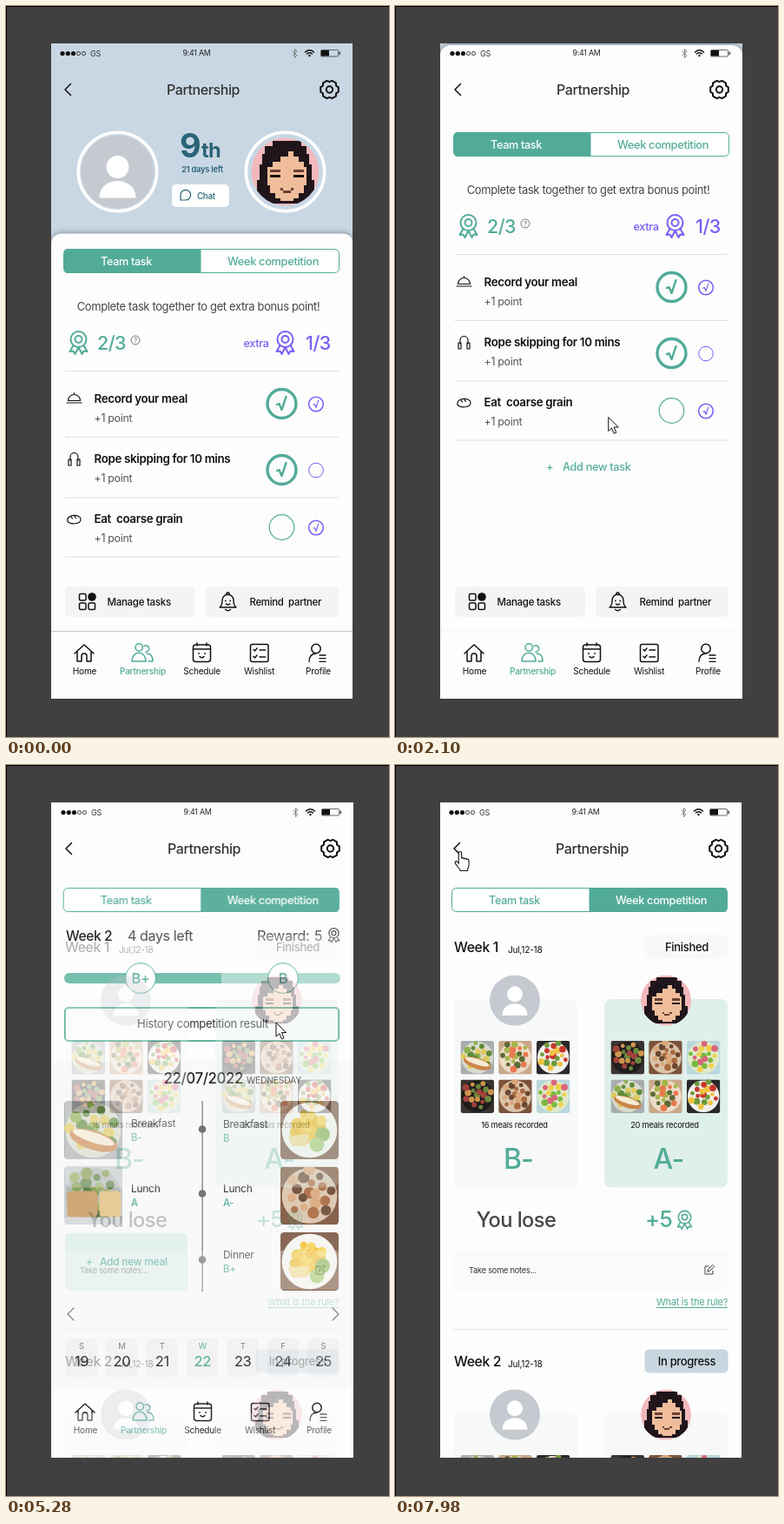
Animation, 441 px wide and 840 px high, one loop 8000 ms. Source, as an HTML page:

```html
<!DOCTYPE html>
<html lang="en">
<head>
<meta charset="utf-8">
<title>Partnership tasks</title>
<style>
  html, body { margin: 0; height: 100%; overflow: hidden; background: #404040; }
  #stage { display: block; width: 100vw; height: 100vh; }
  text { font-family: Inter, "Open Sans", sans-serif; letter-spacing: -.025em; white-space: pre; }
  .sheet { filter: drop-shadow(0 -1px 3px #0005); }
  .line { fill: none; stroke: #111; stroke-width: 1.5; stroke-linecap: round; stroke-linejoin: round; }
</style>
</head>
<body>
<svg id="stage" viewBox="0 0 441 840"></svg>
<script>
const GREEN = '#52ab98', VIOLET = '#7b5cf5', PAPER = '#fdfdfd', TEAL = '#2a6478', BLUE = '#c8d7e3';

// Drawing helpers: each returns SVG markup
const text = (s, x, y, size, fill = '#111', weight = 400, anchor = 'start') =>
  `<text x="${x}" y="${y}" font-size="${size}" fill="${fill}" font-weight="${weight}" text-anchor="${anchor}">${s}</text>`;
const mid = (s, x, y, size, fill, weight) => text(s, x, y, size, fill, weight, 'middle');
const box = (x, y, w, h, r, fill, more = '') =>
  `<rect x="${x}" y="${y}" width="${w}" height="${h}" rx="${r}" fill="${fill}" ${more}/>`;
const disc = (x, y, r, fill, more = '') => `<circle cx="${x}" cy="${y}" r="${r}" fill="${fill}" ${more}/>`;
const ring = (x, y, r, color, w) => disc(x, y, r, 'none', `stroke="${color}" stroke-width="${w}"`);
const line = (d, more = '') => `<path class="line" d="${d}" ${more}/>`;
const ink = (color, w) => `style="stroke:${color};stroke-width:${w}"`;
const rule = y => box(68, y, 315, 1, 0, '#e0e0e0');
const at = (x, y, s, body) => `<g transform="translate(${x} ${y}) scale(${s})">${body}</g>`;

const medal = (x, y, s, color) => at(x, y, s,
  ring(0, -3, 9, color, 2) + ring(0, -3, 4, color, 2) +
  line('M-6 4-10 11-6 10.5-4 14 0 6 4 14 6 10.5 10 11 6 4', ink(color, 2)));
const tick = (x, y, s, color, w) => at(x, y, s, line('M-5.5 1 -3 0 0 7 5 -8', ink(color, w)));

const person = (x, y, s, lift = 0) => at(x, y, s, disc(0, 0, 42, '#c5cad0') +
  at(0, -lift, 1, disc(0, -5.5, 13, '#fff') + '<path d="M-21 30c0-26 42-26 42 0z" fill="#fff"/>'));

const pixels = (color, list) => list.map(r => box(...r, 0, color)).join('');
const girl = (x, y, s) => at(x, y, s, `<g clip-path="url(#round)">` + disc(0, 0, 39, '#f2b8bb') +
  `<g transform="scale(3)" shape-rendering="crispEdges">` +
  pixels('#1f151b', [[-5, -12, 11, 2], [-8, -10, 16, 3], [-9, -7, 18, 4], [-10, -3, 20, 6], [-11, 3, 22, 9]]) +
  pixels('#f0bd9c', [[1, -8, 2, 2], [-2, -6, 7, 2], [-5, -4, 12, 2], [-7, -2, 15, 7], [-6, 5, 13, 3], [-4, 8, 9, 2], [-2, 10, 5, 1]]) +
  pixels('#6b3f33', [[-6, -1, 4, 1], [3, -1, 4, 1], [-2, 6, 1, 1], [-1, 7, 3, 1], [2, 6, 1, 1]]) +
  pixels('#151013', [[-6, 1, 4, 1], [3, 1, 4, 1]]) + '</g></g>');

// Dish pictures: table, plate, then food colours
const DISHES = [
  ['#a9adb0', '#d9dccb', '#8fae4f', '#5f8a3a', '#e0c95c'],
  ['#c9a888', '#ecdcc8', '#a9b64b', '#e8794f', '#5d6a35'],
  ['#29282a', '#f0f0ec', '#c8372d', '#f0c243', '#6f9a3c'],
  ['#3a332f', '#1f1d1d', '#6d8a3e', '#a2413b', '#d0954e'],
  ['#7b5238', '#d9c3aa', '#a9683f', '#d9a77a', '#6b4630'],
  ['#b9d6dc', '#dfe9c8', '#79b943', '#d9657b', '#f0cf4d'],
  ['#7d5a45', '#f4f4f0', '#f3c63d', '#f7d45a', '#eebb33'],
  ['#c4c8ca', '#aeb4b2', '#7f9a4a', '#55783a', '#93a85c']
];
const EXTRA = {
  0: '<ellipse cx="20" cy="27" rx="17" ry="6.5" transform="rotate(18 20 27)" fill="#c9854a"/><ellipse cx="20" cy="25" rx="15" ry="3.5" transform="rotate(18 20 25)" fill="#f5ead2"/>',
  6: '<path d="M5 24 20 23 18 31 8 31z" fill="#f0dc98"/>' + disc(29, 23, 5, '#8fb85a') + disc(25, 30, 5, '#a9cb78'),
  7: box(2, 17, 21, 18, 3, '#c9a06a') + box(24, 17, 15, 18, 3, '#e4c58a') + box(0, 35, 40, 5, 0, '#d5d8d8')
};
function dish(kind, x, y, size) {
  const [table, plate, ...food] = DISHES[kind];
  let s = box(0, 0, 40, 40, 0, table) + disc(20, 20, 19, plate);
  for (let i = 0; i < 18; i++) {
    const a = i * 2.4 + kind, d = (kind === 6 ? 2.6 : 4) * Math.sqrt(i);
    s += disc((20 + d * Math.cos(a)).toFixed(1), (18 + d * Math.sin(a)).toFixed(1), 4 - i % 4 * .5, food[i % 3]);
  }
  return `<svg x="${x}" y="${y}" width="${size}" height="${size}" viewBox="0 0 40 40"><g clip-path="url(#photo)">${s}${EXTRA[kind] || ''}</g></svg>`;
}

function tabs(x, y, right) {
  const half = right ? `M${x + 158} ${y}h155q4 0 4 5v18q0 5-4 5h-155z` : `M${x + 158} ${y}h-153q-5 0-5 5v18q0 5 5 5h153z`;
  return box(x, y + .5, 317, 27, 5, '#fff', `stroke="${GREEN}"`) + `<path d="${half}" fill="${GREEN}"/>` +
    mid('Team task', x + 72, y + 18.5, 12.6, right ? GREEN : '#fff', 500) +
    mid('Week competition', x + 241, y + 18.5, 12.8, right ? '#fff' : GREEN, 500);
}

function gear() {
  const pts = [];
  for (let k = 0; k < 6; k++) for (const [d, r] of [[-.25, 10.6], [.25, 10.6], [Math.PI / 6, 8.8]]) {
    const a = k * Math.PI / 3 + d;
    pts.push((372.5 + r * Math.cos(a)).toFixed(1) + ' ' + (96 + r * Math.sin(a)).toFixed(1));
  }
  return line('M' + pts.join('L') + 'z', ink('#111', 2)) + ring(372.5, 96, 3.7, '#111', 2);
}

const status = [65, 71.3, 77.5, 83.5, 89.5].map((x, i) => i < 3 ? disc(x, 54.5, 2.6, '#111') : ring(x, 54.5, 2.1, '#111', .8)).join('') +
  text('GS', 97, 58, 9, '#333') + mid('9:41 AM', 219.5, 57, 8.8, '#222') +
  line('M330 52l5 5-2.5 2.5v-10l2.5 2.5-5 5', ink('#777', .9)) +
  line('M344.5 53q5-4.5 10 0M346.5 55q3-2.5 6 0', ink('#111', 1.5)) + disc(349.5, 57, 1.2, '#111') +
  box(362.5, 50.5, 20, 7.5, 1, 'none', 'stroke="#444" stroke-width=".8"') + box(363, 51, 9, 6.5, 0, '#111') + box(383.5, 52.5, 1.5, 3.5, 0, '#444') +
  line('M74.5 89.5 68 96l6.5 6.5') + mid('Partnership', 227, 102, 16, '#333', 500) + gear();

const header = box(52, 43, 348, 240, 0, BLUE) +
  ring(128.5, 190.5, 45.2, '#fff', 3.6) + person(128.5, 190.5, 1) +
  ring(321.5, 190.5, 45.2, '#fff', 3.6) + girl(321.5, 190.5, 1) +
  text('9', 200, 174, 38, TEAL, 700) + text('th', 225, 174, 23.5, TEAL, 700) +
  mid('21 days left', 226, 191, 9.3, TEAL, 600) + box(191, 205, 66, 26, 5, '#fff') +
  line('M201 223v-5.5a5.8 5.8 0 1 1 5.8 5.5z', ink(TEAL, 1.2)) + text('Chat', 220, 221.5, 9.7, TEAL, 500);

const ROWS = [
  ['Record your meal', 456, 457, 1, 1, 'M70 456h17M71.5 453.5a7 7 0 0 1 14 0zM78.5 446v-1.5'],
  ['Rope skipping for 10 mins', 525, 533, 1, 0, 'M74 522v-4a4.5 4.5 0 0 1 9 0v4M72 521h3v7h-3zM82 521h3v7h-3z'],
  ['Eat  coarse grain', 594, 599, 0, 1, 'M71 592c-2-8 15-9 15-2 0 6-13 6-15 2M75 587l1.5 2M79 586.5l1.5 2']
];
const list = tabs(66.5, 279, false) +
  mid('Complete task together to get extra bonus point!', 221.5, 350, 12.9, '#444') +
  medal(83.5, 386, 1, GREEN) + text('2/3', 105, 395, 21.5, GREEN, 500) +
  ring(149, 384, 5, '#555', .8) + mid('?', 149, 386.8, 7.5, '#555') +
  text('extra', 273.5, 391.5, 12.7, VIOLET, 500) + medal(321.5, 386, 1, VIOLET) + text('1/3', 345, 395, 21.5, VIOLET, 500) +
  [419, 495, 564.5, 632.5].map(rule).join('') +
  ROWS.map(([name, y, cy, mine, theirs, icon]) =>
    text(name, 101.5, y, 13.35, '#111', 600) + text('+1 point', 101.5, y + 21.5, 12.4, '#555') + line(icon, ink('#111', 1.2)) +
    (mine ? ring(317.5, cy, 16.5, GREEN, 3.4) + tick(317.5, cy, 1, GREEN, 2.4) : ring(317.5, cy, 14.3, GREEN, 1.2)) +
    ring(357, cy + .5, 8.3, VIOLET, theirs ? 1.5 : 1) + (theirs ? tick(357, cy + .5, .55, VIOLET, 2.2) : '')).join('');

const addTask = text('+', 174, 534, 12.7, GREEN, 500) + text('Add new task', 193, 534, 12.7, GREEN, 500);

const buttons = box(68, 667, 150, 35, 5, '#f4f4f4') + box(230, 667, 153, 35, 5, '#f4f4f4') +
  [[84.5, 675.5], [84.5, 686], [95, 686]].map(p => box(...p, 7.5, 7.5, 1.5, 'none', 'stroke="#111" stroke-width="1.5"')).join('') +
  disc(99, 679, 4.8, '#111') + text('Manage tasks', 116.5, 689, 11.5, '#111', 500) +
  line('M246 691q3-2 3-8c0-9 13-9 13 0q0 6 3 8zM254 676.5a1.7 1.7 0 1 1 3 0M252.5 693.5q3 2.5 6 0M253.5 687q2 2 4 0', ink('#111', 1.4)) +
  disc(252.8, 683.5, .9, '#111') + disc(258.2, 683.5, .9, '#111') + text('Remind  partner', 280.5, 689, 11.4, '#111', 500);

const nav = box(51, 718, 350, 80, 0, PAPER) +
  line('M79 744l11-10 11 10M82 742v11h5v-6a3 3 0 0 1 6 0v6h5v-11') +
  line('M149 737a4.2 4.2 0 1 0 8.4 0 4.2 4.2 0 1 0-8.4 0M145 753c0-13 16-13 16 0zM159 735.5a3.6 3.6 0 1 1 2 6.5M162 744c5 0 7 4 7 9h-5', ink(GREEN, 1.5)) +
  box(215.5, 734, 20, 19.5, 3, 'none', 'stroke="#111" stroke-width="1.5"') + line('M215.5 739h20M220 732v3M231 732v3M223 747.5q2.5 2.5 5 0') +
  disc(222, 744, .9, '#111') + disc(229, 744, .9, '#111') +
  box(281.5, 733.5, 20.5, 20, 2, 'none', 'stroke="#111" stroke-width="1.5"') +
  line('M285 739.5l1.5 1.5 2.5-3M285 747.5l1.5 1.5 2.5-3M292 740h6.5M292 748h6.5') +
  ring(357, 738.5, 5.2, '#111', 1.5) + line('M349 753.5q0-9 8-9.5M361 746h7M361 749.7h7M361 753.4h7', ink('#111', 1.3)) +
  ['Home', 'Partnership', 'Schedule', 'Wishlist', 'Profile'].map((s, i) =>
    mid(s, [90.5, 157.5, 225.5, 291.5, 359.5][i], 768, 10.1, i === 1 ? GREEN : '#111', i === 1 ? 500 : 400)).join('');

// Daily competition view
const meal = (x, y, name, grade) => text(name, x, y, 12, '#222') + text(grade, x, y + 15.5, 11.3, GREEN, 500);
const badge = (x, s) => disc(x, 245, 17.3, '#fff', `stroke="${GREEN}"`) + mid(s, x, 251, 16.5, GREEN, 500);
const contest = box(52, 43, 348, 753, 0, PAPER) + tabs(66.5, 141, true) +
  text('Week 2', 69, 202, 15.6, '#111', 500) + text('4 days left', 140, 202, 16.1, '#444') +
  text('Reward:', 289, 202, 16.5, '#444') + text('5', 355, 202, 16, '#444') + medal(377.5, 195, .62, '#444') +
  box(67, 239, 318, 12, 6, '#aad8cc') + `<path d="M248 239H73a6 6 0 0 0 0 12h175z" fill="#68b7a6"/>` +
  badge(155, 'B+') + badge(319, 'B') +
  box(68, 279, 315, 38, 4, '#fff', `stroke="${GREEN}" stroke-width="2"`) + mid('History competition result', 226.5, 302, 13.1, '#222') +
  box(52, 340, 348, 378, 0, '#f8f8f8') +
  text('22/07/2022', 181.5, 366, 16.9, '#111', 500) + text('WEDNESDAY', 277, 366, 10.4, '#222') +
  box(225.5, 386, 1.2, 219, 0, '#666') + [418.5, 492.5, 568.5].map(y => disc(226, y, 4.3, '#666')).join('') +
  dish(0, 67, 386, 67) + dish(7, 67, 461, 67) + [6, 4, 6].map((k, i) => dish(k, 316, 386 + i * 75.5, 67)).join('') +
  meal(144, 416, 'Breakfast', 'B-') + meal(144, 491, 'Lunch', 'A') +
  meal(250, 417, 'Breakfast', 'B') + meal(250, 491, 'Lunch', 'A-') + meal(250, 567, 'Dinner', 'B+') +
  box(68, 538, 141, 66, 5, '#e0f0ec') + text('+', 92, 575, 12, GREEN, 500) + text('Add new meal', 108, 575, 12, GREEN, 500) +
  line('M78 624l-7 7 7 7M376 624l7 7-7 7', ink('#777', 1.2)) +
  [...'SMTWTFS'].map((d, i) => {
    const x = 87 + i * 46.4, now = i === 3;
    return box(x - 18, 659, 36, 44, 5, '#f1f1f1') + mid(d, x, 671, 9.5, now ? GREEN : '#777') +
      mid(19 + i, x, 691, 16.5, now ? GREEN : '#222', now ? 500 : 400);
  }).join('') + '<use href="#nav" x="1"/>';

// Weekly history view
const side = (x, fill, face, dishes, meals, grade) => box(x, 269, 142, 216.5, 8, fill) + face +
  dishes.map((k, i) => dish(k, x + 7.5 + i % 3 * 43.7, 317 + (i > 2) * 44.5, 38.5)).join('') +
  mid(`${meals} meals recorded`, x + 69.5, 416.5, 9.3, '#111') + mid(grade, x + 74, 463.5, 32, GREEN, 500);
const week = (n, state, pill, card) => text('Week ' + n, 68, 215, 15.8, '#111', 500) + text('Jul,12-18', 130, 215.5, 10.2) +
  box(287.5, 195.5, 96, 27, 5, pill) + mid(state, 336, 214, 13, '#111', 500) +
  side(68, '#f7f8f8', person(138, 270.5, .69, 5), [0, 1, 2, 3, 4, 5], 16, 'B-') +
  side(241, card, girl(312, 270.5, .745), [3, 4, 5, 0, 1, 2], 20, 'A-');
const history = tabs(65.5, 141, true) + week(1, 'Finished', '#f7f8f9', '#dfefea') +
  mid('You lose', 139.5, 531, 23.7, '#444', 500) + text('+5', 288, 531, 25.5, GREEN, 500) + medal(333.5, 522, .8, GREEN) +
  box(68, 558, 315, 45, 4, '#fafafa') + text('Take some notes...', 85, 583.5, 9.25, '#333') +
  line('M361 576h-4v9h9v-4M360 582l1-3 4.5-4.5 2 2-4.5 4.5z', ink('#444', 1)) +
  text('What is the rule?', 301, 621, 11, GREEN) + box(301, 623, 82, 1, 0, GREEN) + rule(648) +
  at(0, 476, 1, week(2, 'In progress', '#c8d6e0', '#f7f8f8'));

const group = (id, body) => `<g id="${id}">${body}</g>`;
document.getElementById('stage').innerHTML =
  `<defs><clipPath id="round"><circle r="39"/></clipPath><clipPath id="photo"><rect width="40" height="40" rx="2.5"/></clipPath>` +
  `<clipPath id="screen"><rect id="frame" x="52" y="43" width="347" height="753"/></clipPath></defs>` +
  box(0, 0, 441, 840, 0, '#404040') + '<path d="M0 .5H441M.5 0V840" stroke="#000"/>' +
  '<g clip-path="url(#screen)">' + header +
  `<g id="sheet"><rect class="sheet" x="52" y="261.5" width="348" height="900" rx="12" fill="${PAPER}"/></g>` +
  group('list', list) + group('addTask', addTask) + group('bottom', buttons + group('nav', nav) + group('navLine', box(51, 718, 350, 1, 0, '#c8c8c8'))) +
  group('contest', contest) + group('veil', box(52, 43, 348, 753, 0, PAPER)) + group('history', history) + group('status', status) + '</g>' +
  group('cursor',
    '<path id="arrow" d="M0 0v16l3.7-3.5 2.7 6.3 2.6-1.1-2.7-6.2h5.2z" fill="#fff" stroke="#111" stroke-linejoin="round"/>' +
    '<path id="hand" transform="translate(-6.3 0)" d="M4.6 14V2.2a1.7 1.7 0 0 1 3.4 0v6.3a1.6 1.6 0 0 1 3 .3 1.6 1.6 0 0 1 2.8.7 1.5 1.5 0 0 1 2.5 1.2V16c0 3-1.5 4-1.5 6.5H6.5C6 20 1.5 16 .5 13.5c-.6-1.6 1.6-2.6 2.8-1z" fill="#fff" stroke="#111" stroke-width="1.1"/>');

// Pointer path: time, x, y
const PATH = [
  [780, 434, 606], [840, 392, 614], [900, 350, 611], [1020, 276, 599], [1140, 262, 595], [1260, 252, 588],
  [1440, 252, 588], [1560, 253, 580], [1680, 253, 566], [1920, 251, 507], [2160, 244, 461],
  [2280, 244, 461], [2400, 264, 405], [2580, 328, 225], [2700, 343, 182],
  [2820, 343, 182], [3060, 317, 146], [3480, 317, 146], [3720, 375, 130], [3960, 413, 118],
  [4140, 413, 118], [4260, 400, 140], [4500, 350, 225], [4740, 309, 290], [4800, 311, 297],
  [5160, 311, 297], [5280, 311, 296], [5460, 318, 288], [5820, 337, 255], [5940, 329, 204],
  [6000, 329, 204], [6180, 315, 250], [6540, 225, 420], [6780, 199, 455],
  [6960, 199, 455], [7200, 296, 531], [7380, 260, 450], [7620, 115, 165], [7740, 78, 105],
  [7800, 78, 105], [7920, 75, 99]
];
const HAND = [[3000, 3600], [4740, 5250], [7900, 8000]];

const clamp = v => Math.min(1, Math.max(0, v));
const smooth = u => u * u * (3 - 2 * u);
const el = id => document.getElementById(id);
const move = (id, x, y) => el(id).setAttribute('transform', `translate(${x.toFixed(2)} ${y.toFixed(2)})`);
const fade = (id, v) => el(id).setAttribute('opacity', v.toFixed(3));

function pointer(t) {
  const i = PATH.findIndex(p => p[0] > t);
  if (i < 1) return PATH[PATH.length - 1].slice(1);
  const [t0, x0, y0] = PATH[i - 1], [t1, x1, y1] = PATH[i], u = (t - t0) / (t1 - t0);
  return [x0 + (x1 - x0) * u, y0 + (y1 - y0) * u];
}

function draw(t) {
  const scroll = smooth(clamp((t - 1660) / 490));
  const toContest = clamp((t - 3490) / 300), toHistory = clamp((t - 5190) / 300);
  // Pages after the first sit one pixel further right
  const nudge = Math.round(scroll), shift = nudge - Math.round(toHistory);
  el('frame').setAttribute('width', 347 + shift);
  move('sheet', 0, -223 * scroll);
  move('list', nudge, -138 * scroll);
  move('bottom', nudge, 0);
  move('status', shift, 0);
  fade('addTask', scroll);
  fade('navLine', 1 - .9 * scroll);
  fade('contest', toContest);
  fade('veil', toHistory ** 2);
  fade('history', toHistory);

  fade('cursor', t >= 780 ? 1 : 0);
  if (t >= 780) move('cursor', ...pointer(t));
  const pointing = HAND.some(([a, b]) => t >= a && t < b);
  fade('hand', +pointing);
  fade('arrow', +!pointing);
}

// Time advances in 60 ms steps
const start = performance.now();
function loop() {
  const t = (performance.now() - start) % 8000;
  draw(Math.floor(t / 60) * 60);
  requestAnimationFrame(loop);
}
loop();
</script>
</body>
</html>
```
